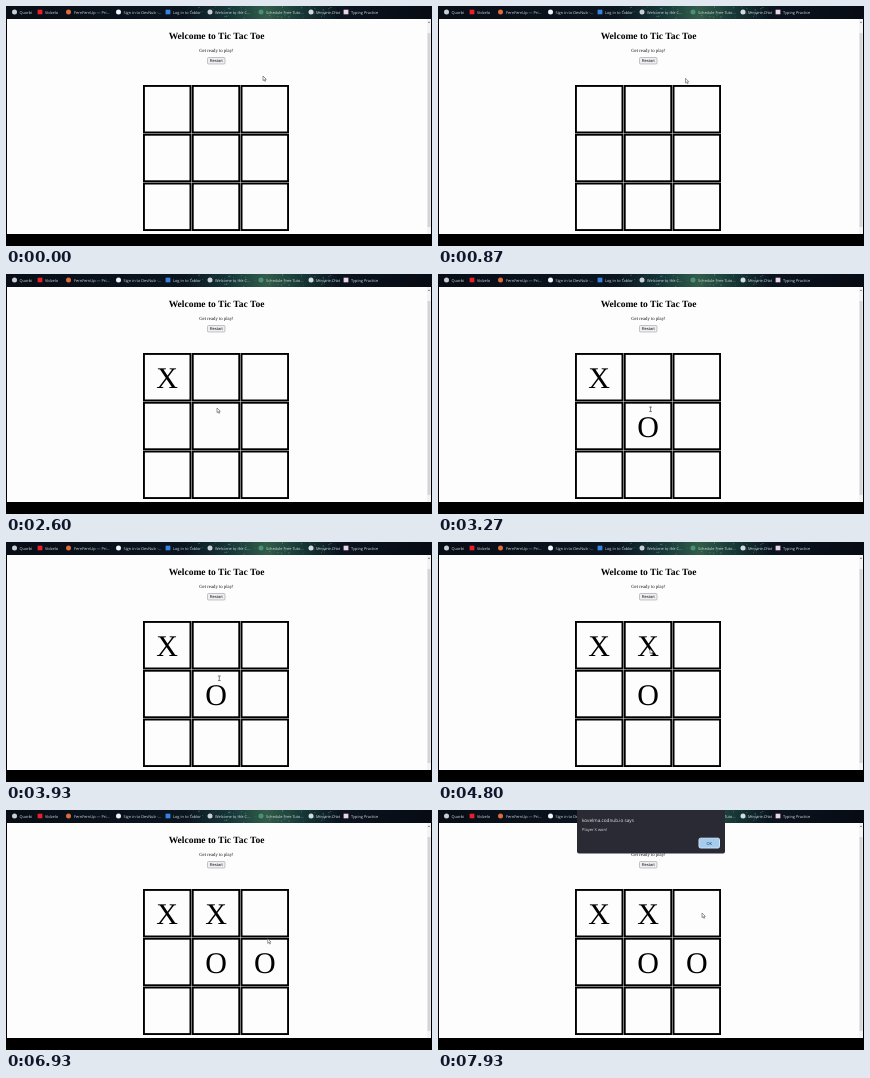
Write an HTML page that moves like this. It is 426 by 240 pixels and loops after 8000 ms.

```html
<!DOCTYPE html>
<html lang="en">
<head>
<meta charset="utf-8">
<title>Tic Tac Toe</title>
<style>
html, body { margin: 0; width: 100%; height: 100%; overflow: hidden; background: #000; }
svg { display: block; width: 100%; height: 100%; }
text { text-rendering: geometricPrecision; white-space: pre; }
.serif { font-family: "Liberation Serif", "Times New Roman", serif; }
.arial { font-family: "Liberation Sans", Arial, sans-serif; }
.ui { font-family: "Open Sans", "Noto Sans", sans-serif; }
</style>
</head>
<body>
<svg id="stage" viewBox="0 0 426 240">
  <defs><linearGradient id="sky"></linearGradient></defs>
  <g id="page"></g>
  <g id="bar"></g>
  <g id="marks"></g>
  <g id="alert"></g>
  <g id="pointer" stroke-width="0.6">
    <path id="arrow" d="M0 0V4.6L1.1 3.7L1.9 5.4L2.7 5L1.9 3.4L3.3 3.3Z" fill="#fff" stroke="#55555c"/>
    <path id="beam" d="M-.6-2H2.2M.8-2V2.6M-.6 2.6H2.2" fill="none" stroke="#333"/>
  </g>
</svg>
<script>
const LOOP = 8000, STEP = 1000 / 15;
const BOARD = { x: 137, y: 79, pitch: 48.8, size: 48.4 };
const byId = id => document.getElementById(id);
const NS = byId('stage').namespaceURI;

// icon x, icon colour, shape, label x, label
const bookmarks = [
  [8.5, '#c9ced2', 'circle', 13.5, 'Quorbi'],
  [34, '#e8202a', 'square', 39, 'Vidzelo'],
  [62.5, '#de6b3c', 'circle', 68, 'FernFernUp — Pri...'],
  [112.5, '#f2f4f5', 'circle', 117.5, 'Sign in to DevNub ·...'],
  [162, '#3b82e0', 'square', 167, 'Log in to Tablor'],
  [204, '#c9ced2', 'circle', 209, 'Welcome to the C...'],
  [255, '#4c8f78', 'circle', 260, 'Schedule Free Tuto...'],
  [305, '#d5dadd', 'circle', 310, 'Mirvane Chat'],
  [340, '#eed3e4', 'square', 345, 'Typing Practice']
];

// time, mark, column, row
const moves = [
  [2130, 'X', 0, 0],
  [3000, 'O', 1, 1],
  [4730, 'X', 1, 0],
  [6200, 'O', 2, 1]
];
const ALERT_AT = 7600;

// time, x, y of the pointer
const path = [
  [0, 257, 70], [700, 257, 70], [1500, 172, 91], [1800, 170, 91.5],
  [2150, 170, 92], [2600, 211, 134], [3930, 212.5, 136],
  [4500, 212, 107], [4850, 212, 107], [5600, 248, 152], [5730, 248, 152.5],
  [6300, 252, 152], [6930, 262, 128], [7300, 264, 103], [8000, 264, 103]
];

function add(parent, tag, attrs) {
  const el = document.createElementNS(NS, tag);
  for (const key in attrs) el.setAttribute(key, attrs[key]);
  return parent.appendChild(el);
}

function rect(parent, x, y, width, height, fill, extra = {}) {
  return add(parent, 'rect', { x, y, width, height, fill, ...extra });
}

function text(parent, str, x, y, font, size, fill, extra = {}) {
  const el = add(parent, 'text', { x, y, class: font, 'font-size': size, fill, ...extra });
  el.textContent = str;
  return el;
}

const centred = { 'text-anchor': 'middle' };

function seeded(seed) {
  return () => (seed = (seed * 16807) % 2147483647) / 2147483647;
}

function buildBar(g) {
  const stops = [[0, '#080d16'], [0.42, '#0a1520'], [0.53, '#16383a'],
    [0.61, '#315c49'], [0.69, '#173a38'], [0.78, '#0a1420'], [1, '#070b13']];
  for (const [offset, colour] of stops) {
    add(byId('sky'), 'stop', { offset, 'stop-color': colour });
  }
  rect(g, 0, 0, 426, 13, 'url(#sky)');

  const rnd = seeded(71);
  for (let i = 0; i < 60; i++) {
    const x = 185 + rnd() * 145, y = rnd() * 12, s = 0.4 + rnd() * 0.8;
    rect(g, x, y, s, s, '#aad7be', { opacity: 0.15 + rnd() * 0.5 });
  }

  for (const [x, fill, shape, labelX, label] of bookmarks) {
    if (shape === 'circle') add(g, 'circle', { cx: x, cy: 6, r: 2.5, fill });
    else rect(g, x - 2.4, 3.7, 4.8, 4.6, fill);
    text(g, label, labelX, 7.6, 'ui', 3.9, '#d8dde0');
  }
}

function buildPage(g) {
  rect(g, 1, 13, 424, 215, '#fdfdfd');
  rect(g, 421, 13, 4, 215, '#f3f3f5');
  rect(g, 421.6, 27, 2.8, 194, '#d3d3d9');
  add(g, 'path', { d: 'M421.8 17L423 15.4L424.2 17Z', fill: '#77777c' });

  text(g, 'Welcome to Tic Tac Toe', 210.5, 33, 'serif', 9.5, '#000',
    { ...centred, 'font-weight': 'bold' });
  text(g, 'Get ready to play!', 210.4, 45.7, 'serif', 4.75, '#111', centred);
  rect(g, 201.5, 51.5, 17.5, 6.5, '#efeff1',
    { rx: 1, stroke: '#8d8d94', 'stroke-width': 0.5 });
  text(g, 'Restart', 210.2, 56.2, 'arial', 4, '#111', centred);

  const line = 1.9, inner = BOARD.size - line;
  for (let i = 0; i < 9; i++) {
    const x = BOARD.x + (i % 3) * BOARD.pitch + line / 2;
    const y = BOARD.y + Math.floor(i / 3) * BOARD.pitch + line / 2;
    rect(g, x, y, inner, inner, 'none', { stroke: '#000', 'stroke-width': line });
  }
}

function buildAlert(g) {
  rect(g, 139, -4, 148, 47.5, '#292a33', { rx: 2 });
  text(g, 'kovelma.codnub.io says', 144, 11.6, 'ui', 4.7, '#e4e5ea');
  text(g, 'Player X won!', 144, 20.6, 'ui', 4, '#dcdde3');
  rect(g, 261, 28.2, 20.5, 9.8, '#a5cbef', { rx: 1.5, stroke: '#d2e6f8' });
  text(g, 'OK', 271.2, 34.6, 'ui', 4, '#17324d', centred);
}

buildPage(byId('page'));
buildBar(byId('bar'));
buildAlert(byId('alert'));
const marks = moves.map(([at, mark, col, row]) => ({
  at,
  el: text(byId('marks'), mark, 161.2 + col * BOARD.pitch,
    113.8 + row * BOARD.pitch, 'serif', 30, '#000', centred)
}));

function pointerAt(t) {
  let i = 1;
  while (i < path.length - 1 && path[i][0] < t) i++;
  const [t0, x0, y0] = path[i - 1], [t1, x1, y1] = path[i];
  const p = (t - t0) / (t1 - t0);
  const e = p * p * (3 - 2 * p);
  return [x0 + (x1 - x0) * e, y0 + (y1 - y0) * e];
}

function show(el, on) {
  el.setAttribute('visibility', on ? 'visible' : 'hidden');
}

function draw(t) {
  for (const { at, el } of marks) show(el, t >= at);
  show(byId('alert'), t >= ALERT_AT);
  const overText = t >= 3000 && t < 4200;
  show(byId('beam'), overText);
  show(byId('arrow'), !overText);
  byId('pointer').setAttribute('transform', `translate(${pointerAt(t)})`);
}

const start = performance.now();
function tick() {
  const t = (performance.now() - start) % LOOP;
  draw(Math.floor(t / STEP) * STEP);
  requestAnimationFrame(tick);
}
tick();
</script>
</body>
</html>
```
